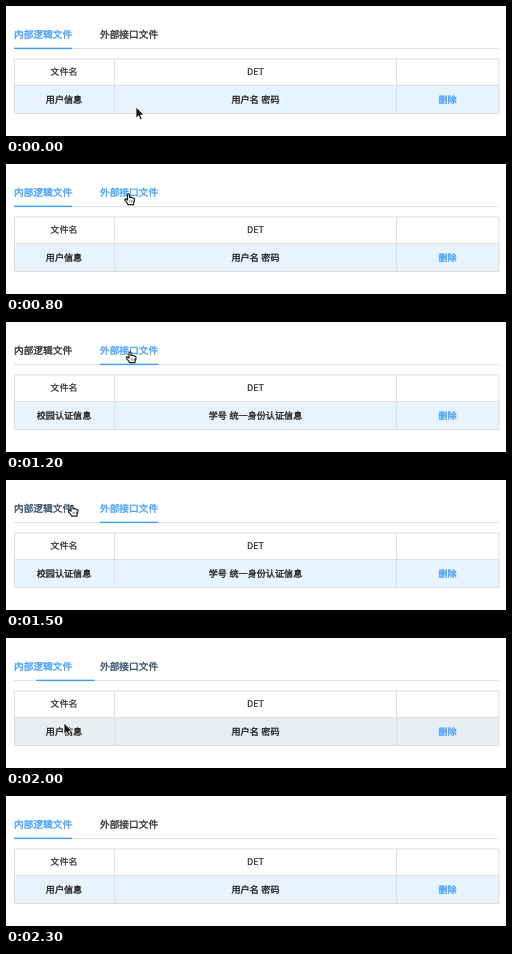
These frames come from a looping animation (500 px wide and 130 px high, 2400 ms). An HTML page:

```html
<!DOCTYPE html>
<html lang="zh-CN">
<head>
<meta charset="utf-8">
<style>
  html, body { margin: 0; width: 100%; height: 100%; overflow: hidden; background: #fff; }
  svg { display: block; width: 500px; height: 130px; }
  text { font-family: "Noto Sans CJK SC", "Noto Sans CJK", "Noto Sans", sans-serif; text-rendering: geometricPrecision; }
  .tab { font-size: 9.7px; font-weight: 500; stroke-width: .35px; }
  .cell { font-size: 9.1px; fill: #222; stroke: #222; stroke-width: .35px; text-anchor: middle; word-spacing: .5px; }
  .head { stroke-width: .15px; }
  .link { fill: #409eff; stroke: #409eff; }
  .grid { fill: none; stroke: #dddee0; }
</style>
</head>
<body>
<svg viewBox="0 0 500 130">
  <text id="tabInner" class="tab" x="8" y="31.8">内部逻辑文件</text>
  <text id="tabOuter" class="tab" x="94" y="31.8">外部接口文件</text>
  <rect x="8" y="41.9" width="485" height="1.2" fill="#dfe2e8"/>
  <rect id="bar" x="8" y="41.7" width="58.2" height="1.4" fill="#409eff"/>

  <rect id="row" x="8.5" y="79.5" width="484.5" height="28"/>
  <path class="grid" d="M8.5 52.9H493V107.5H8.5ZM8.5 79.5H493M108.6 52.9V107.5M390.6 52.9V107.5"/>
  <text class="cell head" x="58" y="69.2">文件名</text>
  <text class="cell head" x="249.5" y="69.2">DET</text>
  <text id="fileName" class="cell" x="58" y="97"></text>
  <text id="fields" class="cell" x="249.5" y="97"></text>
  <text class="cell link" x="441.5" y="97">删除</text>

  <g id="arrow">
    <path d="M0 0V11.2L2.6 8.8L4.4 12.8L6.3 12L4.5 8.1H8Z" fill="#111" stroke="#fff" stroke-width=".8"/>
  </g>
  <g id="hand">
    <path d="M-1 1Q0 -.4 1 1V3.8Q2.2 3 3 4.1Q4.3 3.5 4.8 4.8Q6 4.4 6 6Q6 8.3 5 9.5V11.1H-.4Q-1.2 9.5 -3.3 7.1Q-4.2 5.7 -3 5.3Q-2 5.2 -1 6.4Z"
      fill="#fff" stroke="#222" stroke-width="1.2" stroke-linejoin="round"/>
    <path d="M1.2 6.7V9M2.9 6.7V9M4.5 6.7V9" stroke="#333" stroke-width=".6"/>
  </g>
  <g id="ibeam">
    <path d="M-2 -5Q0 -5 0 -3.8Q0 -5 2 -5M0 -4V4M-2 5Q0 5 0 3.8Q0 5 2 5M-1 .9H1" fill="none" stroke="#222"/>
  </g>
</svg>
<script>
const LOOP = 2400, STEP = 100;
const BLUE = [64, 158, 255], DARK = [48, 49, 51];
const STRIPE = [231, 243, 253], HOVER = [233, 233, 233];
const $ = id => document.getElementById(id);

// time, x, y, cursor shape
const path = [
  [0, 130, 101, "arrow"], [100, 125, 75, "arrow"], [200, 119, 42, "arrow"], [300, 117.5, 28, "arrow"],
  [400, 119, 29, "hand"], [600, 121.5, 29.6, "hand"], [800, 122.5, 29.6, "hand"], [1200, 124, 29.6, "hand"],
  [1300, 118, 29, "hand"], [1500, 66, 25, "hand"], [1600, 53, 23.5, "hand"], [1800, 51.5, 23.2, "hand"],
  [1900, 54, 46, "arrow"], [2000, 58, 85, "arrow"], [2100, 60, 102, "ibeam"], [2200, 60, 102, ""], [LOOP, 60, 102, ""]
];
const hover = [[0, 0], [100, .5], [200, .25], [300, 0], [1900, 0], [2000, .6], [2100, 1], [2200, .5], [2300, 0], [LOOP, 0]];

const mix = (a, b, k) => a + (b - a) * k;
const color = (a, b, k) => `rgb(${a.map((v, i) => Math.round(mix(v, b[i], k)))})`;
const ease = (t, from, to) => {
  const k = Math.min(1, Math.max(0, (t - from) / (to - from)));
  return k * k * (3 - 2 * k);
};

function sample(keys, t) {
  const i = keys.findIndex((key, n) => t >= key[0] && t < keys[n + 1][0]);
  const a = keys[i], b = keys[i + 1], k = (t - a[0]) / (b[0] - a[0]);
  return a.map((v, n) => typeof v === "number" ? mix(v, b[n], k) : v);
}

function paint(id, value) {
  $(id).setAttribute("fill", value);
  if (id !== "row") $(id).setAttribute("stroke", value);
}

function draw(t) {
  const outer = t >= 900 && t < 1800;
  $("fileName").textContent = outer ? "校园认证信息" : "用户信息";
  $("fields").textContent = outer ? "学号 统一身份认证信息" : "用户名 密码";
  $("bar").setAttribute("x", mix(8, 94, ease(t, 900, 1200) - ease(t, 1800, 2100)));
  paint("tabInner", color(DARK, BLUE, 1 - ease(t, 900, 1200) + ease(t, 1400, 1700)));
  paint("tabOuter", color(DARK, BLUE, ease(t, 300, 600) - ease(t, 1800, 2100)));
  paint("row", color(STRIPE, HOVER, sample(hover, t)[1]));

  const [, x, y, shape] = sample(path, t);
  for (const id of ["arrow", "hand", "ibeam"]) {
    $(id).setAttribute("display", id === shape ? "inline" : "none");
    $(id).setAttribute("transform", `translate(${x} ${y})`);
  }
}

const start = performance.now();
function tick() {
  const t = (performance.now() - start) % LOOP;
  draw(Math.floor(t / STEP) * STEP);
  requestAnimationFrame(tick);
}
tick();
</script>
</body>
</html>
```
